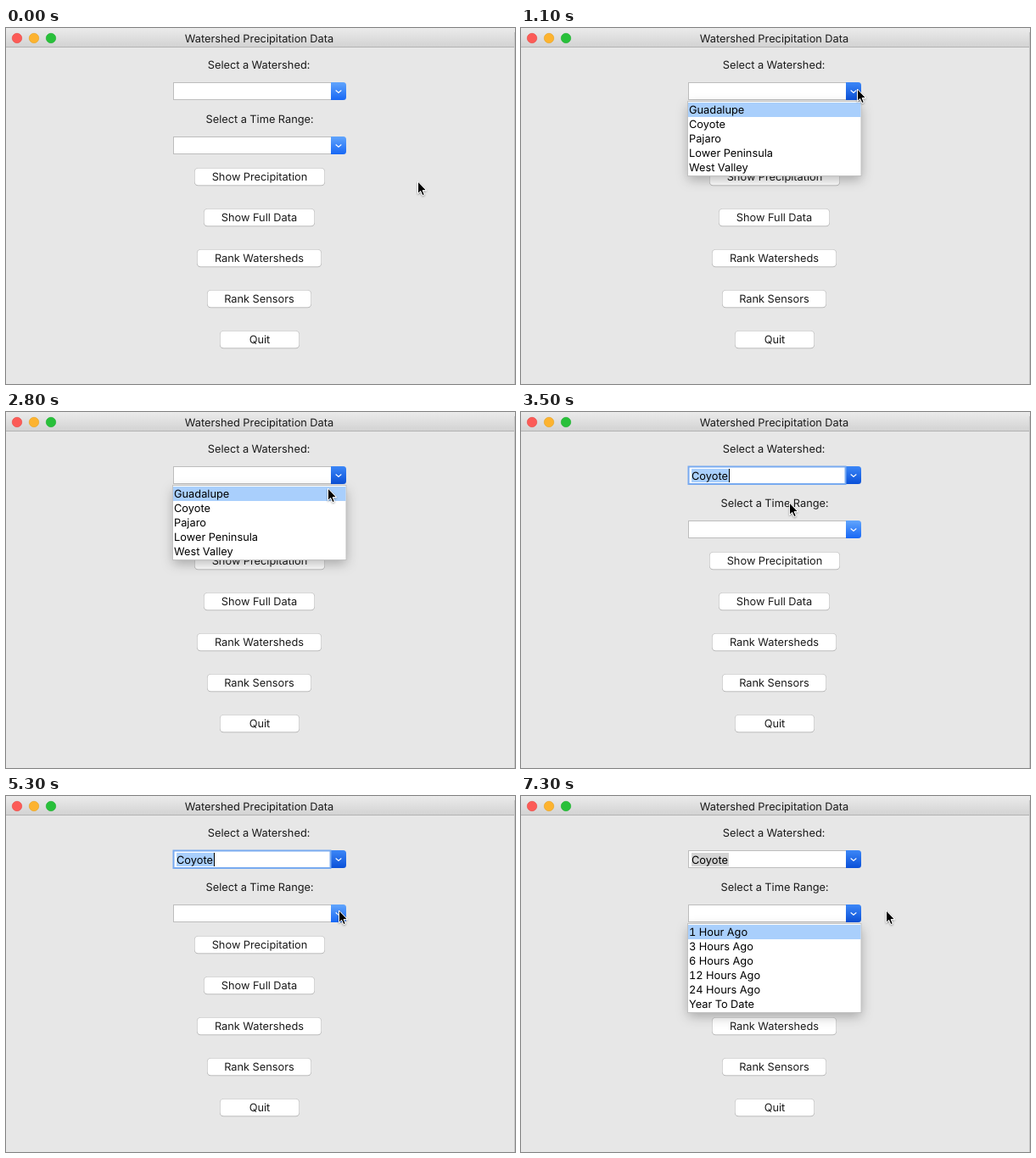
An HTML page for the animation above (8000 ms loop, 600x420 px).

```html
<!DOCTYPE html>
<html lang="en">
<head>
<meta charset="utf-8">
<title>Watershed Precipitation Data</title>
<style>
  html, body { margin: 0; width: 100%; height: 100%; overflow: hidden; background: #e7e7e7; }
  svg { display: block; width: 600px; height: 420px; }
  text {
    font: 12.8px Inter, Roboto, sans-serif; fill: #1a1a1a;
    font-variant-numeric: tabular-nums; text-rendering: geometricPrecision;
  }
  .mid { text-anchor: middle; }
  .item { fill: #000; }
</style>
</head>
<body>
<svg id="stage" viewBox="0 0 600 420" xmlns="http://www.w3.org/2000/svg">
  <defs>
    <linearGradient id="bar" x2="0" y2="1">
      <stop stop-color="#ebebeb"/><stop offset="1" stop-color="#d3d3d3"/>
    </linearGradient>
    <linearGradient id="idle" x2="0" y2="1">
      <stop stop-color="#61a5fc"/><stop offset="1" stop-color="#1767f5"/>
    </linearGradient>
    <linearGradient id="down" x2="0" y2="1">
      <stop stop-color="#3c87f7"/><stop offset="1" stop-color="#0a50d8"/>
    </linearGradient>
    <filter id="soft" x="-20%" y="-40%" width="140%" height="190%">
      <feDropShadow dx="0" dy="5" stdDeviation="7" flood-opacity=".28"/>
    </filter>
    <filter id="lift" x="-50%" y="-50%" width="200%" height="200%">
      <feDropShadow dx="0" dy="1" stdDeviation=".9" flood-opacity=".4"/>
    </filter>
  </defs>
</svg>
<script>
const NS = 'http://www.w3.org/2000/svg';
const LOOP = 8000;
const stage = document.getElementById('stage');

function add(parent, tag, attrs, content) {
  const el = document.createElementNS(NS, tag);
  for (const key in attrs) el.setAttribute(key, attrs[key]);
  if (content) el.textContent = content;
  return parent.appendChild(el);
}
const rect = (parent, x, y, width, height, fill, more) =>
  add(parent, 'rect', { x, y, width, height, fill, ...more });
const label = (x, y, str) => add(stage, 'text', { x, y, class: 'mid' }, str);
const show = (el, on) => el.setAttribute('visibility', on ? 'visible' : 'hidden');

function pushButton(x, right, y, str) {
  const w = right - x;
  rect(stage, x, y + .5, w, 20.7, '#b2b2b2', { rx: 4.5 });
  rect(stage, x, y, w, 20.5, '#cbcbcb', { rx: 4.5 });
  rect(stage, x + .8, y + .8, w - 1.6, 19.4, '#fff', { rx: 3.8 });
  label(x + w / 2, y + 15, str);
}

function combo(y) {
  rect(stage, 197.5, y + .5, 186, 20, '#fff', { stroke: '#bdbdbd' });
  const face = add(stage, 'path', {
    d: `M383 ${y}h14.5a3.5 3.5 0 0 1 3.5 3.5v14a3.5 3.5 0 0 1 -3.5 3.5h-14.5z`, fill: 'url(#idle)'
  });
  add(stage, 'path', {
    d: `M389 ${y + 9.8}l3 2.6 3 -2.6`, fill: 'none', stroke: '#fff',
    'stroke-width': 1.2, 'stroke-linecap': 'round', 'stroke-linejoin': 'round'
  });
  return face;
}

function dropList(y, items) {
  const g = add(stage, 'g', {});
  const h = items.length * 17 + 2;
  rect(g, 197, y, 204, h, '#fff', { filter: 'url(#soft)' });
  rect(g, 196.5, y - .5, 204.5, h + 1, '#fff', { stroke: '#c2c2c2' });
  rect(g, 197, y + 1, 203.5, 17, '#a9cffc');
  items.forEach((str, i) =>
    add(g, 'text', { x: 198, y: y + 14.4 + i * 17, class: 'item' }, str));
  return g;
}

// Window frame
rect(stage, 0, 0, 600, 420, '#e7e7e7');
rect(stage, 0, 0, 600, 22, 'url(#bar)');
rect(stage, 0, 22, 600, 1, '#b3b3b3');
rect(stage, 599, 5, 1, 415, '#c6c6c6');
[['#fc5b57', '#ea4e48'], ['#fdb32f', '#e9a728'], ['#28c03a', '#22b233']].forEach(([fill, stroke], i) =>
  add(stage, 'circle', { cx: 13 + i * 20, cy: 12, r: 5.7, fill, stroke, 'stroke-width': .7 }));
label(298.5, 17, 'Watershed Precipitation Data');

// Form
label(298, 48.4, 'Select a Watershed:');
label(299, 112.4, 'Select a Time Range:');
const face1 = combo(64);
const face2 = combo(128);
pushButton(222, 376, 165, 'Show Precipitation');
pushButton(233, 364, 213, 'Show Full Data');
pushButton(225, 372, 261, 'Rank Watersheds');
pushButton(237, 360, 309, 'Rank Sensors');
pushButton(252, 346, 357, 'Quit');

const ring = rect(stage, 197.5, 64.5, 185, 20.5, 'none', { stroke: '#78aaf0', 'stroke-width': 2 });
const chosen = add(stage, 'g', {});
const mark = rect(chosen, 201, 67, 44, 16, '#a9cffc');
add(chosen, 'text', { x: 201, y: 80, class: 'item' }, 'Coyote');
const caret = rect(stage, 245, 67, 1, 16, '#000');

const list1 = dropList(87, ['Guadalupe', 'Coyote', 'Pajaro', 'Lower Peninsula', 'West Valley']);
const list2 = dropList(151, ['1 Hour Ago', '3 Hours Ago', '6 Hours Ago', '12 Hours Ago', '24 Hours Ago', 'Year To Date']);

const pointer = add(stage, 'path', {
  d: 'M.5 0V14.4L3.7 11.4L5.9 16.6L8.3 15.6L6.1 10.6H10.6Z',
  fill: '#000', stroke: '#fff', 'stroke-width': 1, 'stroke-linejoin': 'round', filter: 'url(#lift)'
});

// Pointer stops: time, x, y
const path = [
  [0, 485, 181], [300, 478, 159], [600, 460, 116], [900, 392, 72], [1000, 392, 72],
  [1600, 442, 73], [2500, 442, 73], [3100, 316, 107], [3500, 316, 107],
  [4200, 441, 111], [4600, 442, 112], [5300, 392, 135], [6200, 392, 135],
  [7000, 429, 135], [7300, 430, 135], [LOOP, 430, 135]
];

function pointAt(t) {
  const i = path.findIndex(p => p[0] > t);
  const [t0, x0, y0] = path[i - 1], [t1, x1, y1] = path[i];
  const u = (t - t0) / (t1 - t0);
  const k = t < 900 ? u : u * u * (3 - 2 * u);
  return [x0 + (x1 - x0) * k, y0 + (y1 - y0) * k];
}

function draw(now) {
  // The screen refreshes ten times a second
  const t = Math.floor((now % LOOP) / 100) * 100;
  const picked = t >= 3400;
  const focused = picked && t < 6200;
  face1.setAttribute('fill', t >= 900 ? 'url(#down)' : 'url(#idle)');
  face2.setAttribute('fill', t >= 5900 ? 'url(#down)' : 'url(#idle)');
  show(list1, t >= 1000 && !picked);
  show(list2, t >= 6200);
  show(chosen, picked);
  show(ring, focused);
  show(caret, focused && t < 5900 && (t - 3400) % 900 < 600);
  mark.setAttribute('fill', focused ? '#a9cffc' : '#d4d4d4');
  pointer.setAttribute('transform', `translate(${pointAt(t).map(Math.round)})`);
}

const start = performance.now();
function tick() {
  draw(performance.now() - start);
  requestAnimationFrame(tick);
}
tick();
</script>
</body>
</html>
```
